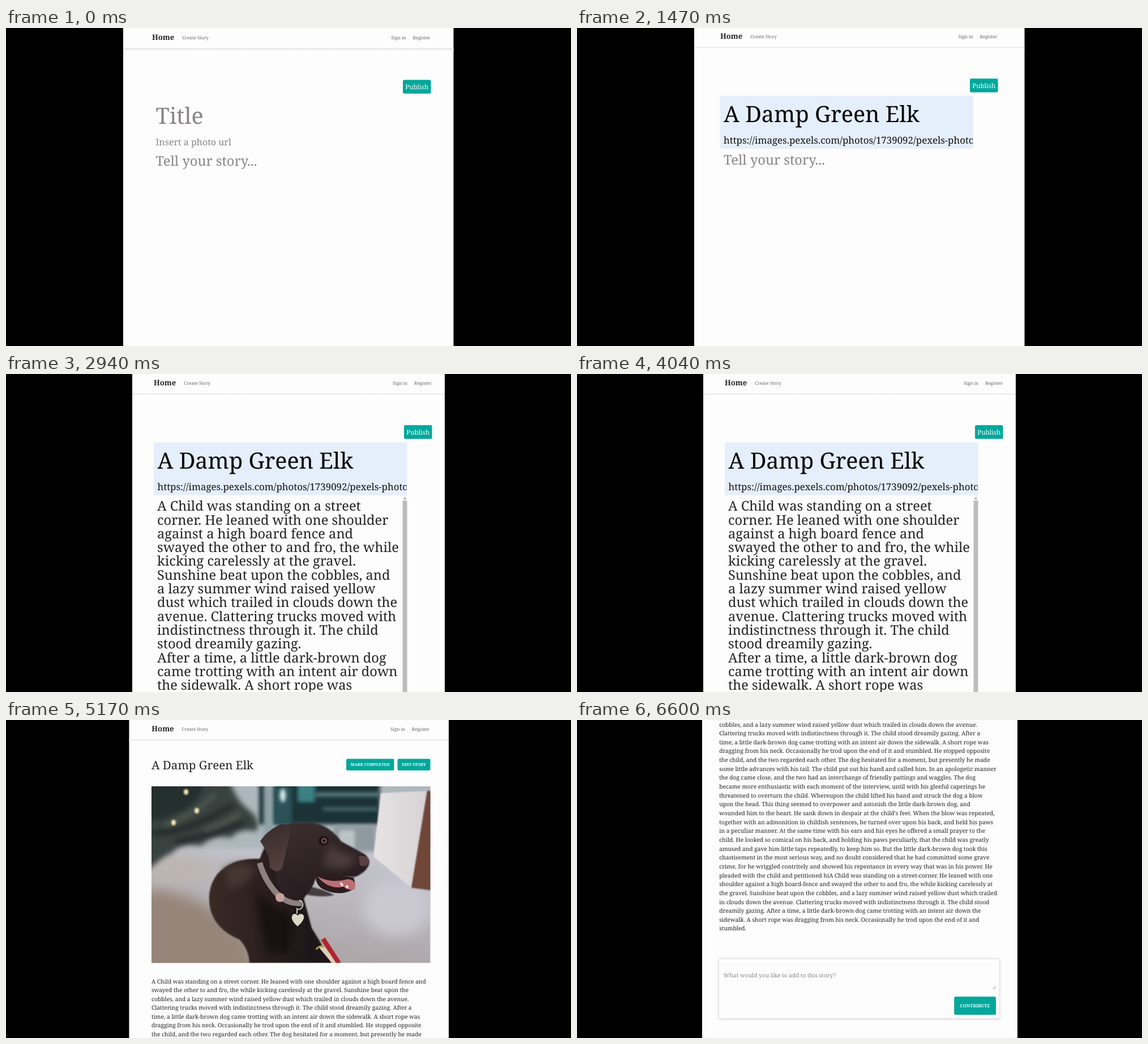
Write an HTML page with a canvas that moves like this. It is 998 by 561 pixels and loops after 6.63 s.

```html
<!DOCTYPE html>
<html lang="en">
<head>
<meta charset="utf-8">
<title>Story editor</title>
<style>
html, body { margin: 0; width: 100%; height: 100%; overflow: hidden; background: #000; }
canvas { display: block; width: 998px; height: 561px; }
</style>
</head>
<body>
<canvas id="stage" width="998" height="561"></canvas>
<script>
const LOOP = 6630;
const TEAL = '#03a79b', PAPER = '#fdfdfd', INK = '#222', HINT = '#888584';
const FAMILY = '"Noto Serif", serif';
const HEADING = 'A Damp Green Elk';
const ctx = document.getElementById('stage').getContext('2d');
ctx.textRendering = 'geometricPrecision';

const story = [
  'A Child was standing on a street corner. He leaned with one shoulder against a high board fence and',
  'swayed the other to and fro, the while kicking carelessly at the gravel. Sunshine beat upon the',
  'cobbles, and a lazy summer wind raised yellow dust which trailed in clouds down the avenue.',
  'Clattering trucks moved with indistinctness through it. The child stood dreamily gazing. After a',
  'time, a little dark-brown dog came trotting with an intent air down the sidewalk. A short rope was',
  'dragging from his neck. Occasionally he trod upon the end of it and stumbled. He stopped opposite',
  'the child, and the two regarded each other. The dog hesitated for a moment, but presently he made',
  'some little advances with his tail. The child put out his hand and called him. In an apologetic manner',
  'the dog came close, and the two had an interchange of friendly pattings and waggles. The dog',
  'became more enthusiastic with each moment of the interview, until with his gleeful caperings he',
  'threatened to overturn the child. Whereupon the child lifted his hand and struck the dog a blow',
  'upon the head. This thing seemed to overpower and astonish the little dark-brown dog, and',
  "wounded him to the heart. He sank down in despair at the child's feet. When the blow was repeated,",
  'together with an admonition in childish sentences, he turned over upon his back, and held his paws',
  'in a peculiar manner. At the same time with his ears and his eyes he offered a small prayer to the',
  'child. He looked so comical on his back, and holding his paws peculiarly, that the child was greatly',
  'amused and gave him little taps repeatedly, to keep him so. But the little dark-brown dog took this',
  'chastisement in the most serious way, and no doubt considered that he had committed some grave',
  'crime, for he wriggled contritely and showed his repentance in every way that was in his power. He',
  'pleaded with the child and petitioned hiA Child was standing on a street-corner. He leaned with one',
  'shoulder against a high board-fence and swayed the other to and fro, the while kicking carelessly at',
  'the gravel. Sunshine beat upon the cobbles, and a lazy summer wind raised yellow dust which trailed',
  'in clouds down the avenue. Clattering trucks moved with indistinctness through it. The child stood',
  'dreamily gazing. After a time, a little dark-brown dog came trotting with an intent air down the',
  'sidewalk. A short rope was dragging from his neck. Occasionally he trod upon the end of it and',
  'stumbled.'
];

const draft = [
  'A Child was standing on a street', 'corner. He leaned with one shoulder',
  'against a high board fence and', 'swayed the other to and fro, the while',
  'kicking carelessly at the gravel.', 'Sunshine beat upon the cobbles, and',
  'a lazy summer wind raised yellow', 'dust which trailed in clouds down the',
  'avenue. Clattering trucks moved with', 'indistinctness through it. The child',
  'stood dreamily gazing.', 'After a time, a little dark-brown dog',
  'came trotting with an intent air down', 'the sidewalk. A short rope was'
];

// One size factor for the whole face: the page design averages 43.67em on this line.
ctx.font = `100px ${FAMILY}`;
const sizeAdjust = 4367 / ctx.measureText(story[2]).width;

function text(str, x, y, size, color = INK, weight = 400, align = 'left') {
  ctx.font = `${weight} ${size * sizeAdjust}px ${FAMILY}`;
  ctx.textAlign = align;
  ctx.fillStyle = color;
  ctx.fillText(str, x, y);
}

function rect(x1, y1, x2, y2, color) {
  ctx.fillStyle = color;
  ctx.fillRect(x1, y1, x2 - x1, y2 - y1);
}

function shape(d, color) {
  ctx.fillStyle = color;
  ctx.fill(new Path2D(d));
}

function line(d, color, width) {
  ctx.strokeStyle = color;
  ctx.lineWidth = width;
  ctx.stroke(new Path2D(d));
}

function oval(x, y, rx, ry, color) {
  ctx.fillStyle = color;
  ctx.beginPath();
  ctx.ellipse(x, y, rx, ry, 0, 0, 7);
  ctx.fill();
}

function shade(x1, y1, x2, y2, from, to) {
  const g = ctx.createLinearGradient(x1, y1, x2, y2);
  g.addColorStop(0, from);
  g.addColorStop(1, to);
  return g;
}

function blur(radius) {
  ctx.filter = radius ? `blur(${radius}px)` : 'none';
}

function button(label, x1, y1, x2, y2, size, weight) {
  ctx.fillStyle = TEAL;
  ctx.beginPath();
  ctx.roundRect(x1, y1, x2 - x1, y2 - y1, 2.5);
  ctx.fill();
  text(label, (x1 + x2) / 2, (y1 + y2) / 2 + size * 0.35, size, '#f4fffd', weight, 'center');
}

function page(left, right) {
  rect(0, 0, 998, 561, '#000');
  rect(left, 0, right, 561, PAPER);
}

function header(left, right, homeX, signX, y, soft) {
  const edge = y + 14.5, depth = soft ? 5 : 3;
  ctx.fillStyle = shade(0, edge, 0, edge + depth, '#e2e2e2', PAPER);
  ctx.fillRect(left, edge, right - left, depth);
  text('Home', homeX, y + 0.3, 13.5, INK, 700);
  text('Create Story', homeX + 53.3, y - 1, 8.2, '#666');
  text('Sign in', signX, y - 1, 8.2, '#666');
  text('Register', signX + 38, y - 1, 8.2, '#666');
}

function editor(dx, dy, dRight, filled) {
  const x = 264.5 + dx;
  button('Publish', 701 + dRight, 91.5 + dy, 750.5 + dRight, 115.7 + dy, 11.8);
  if (!filled) {
    text('Title', x, 169, 40.5, HINT);
    text('Insert a photo url', x, 206.5, 16.4, HINT);
    return;
  }
  const left = 258 + dx, right = left + 447.5;
  rect(left, 122 + dy, right, 215 + dy, '#e5eefb');
  text(HEADING, x, 168.5 + dy, 40.5, '#000');
  ctx.save();
  ctx.beginPath();
  ctx.rect(left, 180, right - left - 1, 40);
  ctx.clip();
  text('https://images.pexels.com/photos/1739092/pexels-photo-1739092.jpeg', x, 206 + dy, 17.3, '#111');
  ctx.restore();
}

function blankDraft(t) {
  page(207, 790.5);
  header(207, 790.5, 258, 680.5, 21, t < 40);
  editor(0, 0, 0, false);
  text('Tell your story...', 264.5, 243, 24.3, HINT);
}

function titledDraft(t) {
  const [left, right] = t < 1500 ? [207, 790.5] : [222, 776];
  page(left, right);
  header(left, right, 253, 673.5, 19);
  editor(-5.5, -2.2, -7, true);
  text('Tell your story...', 259, 240.5, 24.3, HINT);
}

function fullDraft() {
  page(223, 775);
  header(223, 775, 261, 683, 20);
  editor(3, -1.2, 2, true);
  draft.forEach((row, i) => text(row, 267, 241.2 + i * 24.3, 24.2));
  rect(700.5, 214, 708.5, 561, '#f1f1f1');
  rect(700.5, 223.5, 708.5, 561, '#bdbdbd');
  shape('M702.5 220.5h4l-2-2.5z', '#777');
}

function room() {
  rect(257, 117, 750, 429, shade(500, 230, 470, 429, '#c3c3cc', '#aaa1a2'));
  blur(12);
  shape('M230 300Q330 290 420 380L450 450H230Z', '#968579');
  oval(310, 265, 60, 20, '#bdb4ae');
  oval(690, 330, 60, 50, '#cac9d2');
  blur(3);
  rect(250, 110, 760, 226, '#adb7bc');
  rect(447, 110, 660, 184, '#1b3236');
  rect(455, 110, 474, 230, '#8fa3a7');
  rect(474, 117, 505, 184, '#2b5257');
  rect(515, 110, 546, 145, '#3b8182');
  rect(546, 128, 660, 135, '#5c7f83');
  rect(560, 154, 656, 160, '#4a6a70');
  rect(580, 186, 652, 232, '#8e9a9f');
  rect(588, 194, 616, 228, '#bcc3c6');
  oval(489, 133, 5, 12, '#e4f8f9');
}

function tree() {
  blur(5);
  shape('M245 105H395Q404 139 428 158Q452 176 442 196Q410 190 398 208Q365 200 345 222Q310 214 294 234Q274 242 245 270Z', '#38423f');
  shape('M245 105H350Q345 150 300 165Q270 180 245 175Z', '#252f2d');
  line('M257 200Q320 200 400 150M300 215Q360 205 420 180', '#1f2826', 8);
  line('M280 185Q330 170 370 130M350 195Q390 180 415 165', '#59655c', 5);
  blur(1.5);
  for (const [x, y] of [[318, 127], [337, 160], [296, 181]]) oval(x, y, 4, 5, '#fbe7b4');
}

function dog() {
  blur(1);
  const coat = shade(360, 330, 540, 330, '#3b2a26', '#1d1618');
  shape('M533 293Q560 298 580 309Q556 314 530 308Z', '#443c3e');
  shape('M448 245Q400 242 373 272Q352 300 362 338Q373 371 412 387Q429 404 430 429H576Q554 389 540 367Q533 340 526 315L543 289Q535 205 510 182Q468 190 448 245Z', coat);
  shape('M472 250Q457 192 507 182Q536 178 557 185Q579 195 592 214L634 237Q645 247 640 258Q633 271 616 277L550 275L541 293Q520 325 501 319Q478 303 472 250Z', shade(490, 190, 530, 310, '#3a2d2e', '#271d20'));
  blur(7);
  shape('M385 262Q420 245 440 262Q430 290 395 300Z', '#463733');
  shape('M440 300Q465 330 505 345L500 410H460Z', '#17110f');
  shape('M570 222L622 245L600 262L560 258Z', '#4b3c3d');
  blur(0.7);
  shape('M548 271Q585 273 614 278Q620 295 611 300Q588 312 559 298Q545 290 548 271Z', '#2b1c20');
  shape('M550 276Q575 289 603 281Q620 281 616 299Q604 302 596 294Q570 300 550 276Z', '#bd6f74');
  line('M591 287l4 6M601 292l3 4', '#eee3db', 4);
  shape('M623 240Q641 238 642 251Q635 262 625 256Z', '#5c4041');
  shape('M449 214Q461 195 485 184Q504 180 501 204Q494 234 488 261Q479 273 466 260Q466 237 449 214Z', shade(460, 200, 490, 265, '#3d2f30', '#57423f'));
  oval(561, 213, 9, 8, '#1b1417');
  oval(562, 213, 5, 5, '#765549');
  oval(562, 213, 2.5, 2.5, '#15100f');

  // collar and tag
  line('M448 252Q458 286 482 310Q501 326 522 323', '#8c8081', 10);
  oval(484, 313, 8, 8, '#c7a09b');
  line('M518 318a7 8 0 1 1-4 15v9', '#c8c5c3', 2);
  shape('M515 364Q500 351 507 343Q512 340 515 345Q521 339 526 345Q528 353 515 364Z', '#ddd8c3');
}

function photo() {
  ctx.save();
  ctx.beginPath();
  ctx.rect(257, 117, 492.5, 311.5);
  ctx.clip();
  room();
  tree();
  blur(1);
  shape('M649 241L662 129L744 125L717 297Z', shade(655, 0, 740, 0, '#e6e2e3', '#d8d4d6'));
  shape('M744 125L755 125V301L716 296Z', '#6f4638');
  dog();

  // toy
  line('M556 399L582 430', '#ddcfb6', 8);
  line('M560 386L588 429', '#b3242e', 8);
  line('M548 405Q552 397 562 400', '#a79c3f', 3);
  ctx.restore();
}

function published() {
  page(217.4, 782);
  header(217.4, 782, 257.3, 679, 20);
  text(HEADING, 257, 86.5, 21.1);
  button('MARK COMPLETED', 601, 68.5, 685.5, 89, 7.2, 700);
  button('EDIT STORY', 691.5, 68.5, 749.5, 89, 7.2, 700);
  photo();
  story.slice(0, 7).forEach((row, i) => text(row, 257, 464.5 + i * 15.55, 10.42));
}

function scrolledEnd(t) {
  if (t < 5540) page(217.4, 782);
  else page(221, 778);
  story.slice(2).forEach((row, i) => text(row, 251.2, 11.5 + i * 15.65, 10.44));

  ctx.save();
  ctx.shadowColor = '#b9b9c8';
  ctx.shadowBlur = 4;
  rect(251, 422, 746, 526.5, PAPER);
  ctx.restore();
  text('What would you like to add to this story?', 259, 454, 10.42, HINT);
  line('M734.5 474.5L739.5 469.5M737.5 474.5L739.5 472.5', '#888', 1);
  button('CONTRIBUTE', 666.2, 488, 740, 520, 8.1, 700);
}

// Each scene runs until its end time.
const scenes = [
  [1300, blankDraft],
  [2740, titledDraft],
  [4070, fullDraft],
  [5300, published],
  [LOOP, scrolledEnd]
];

const start = performance.now();

function frame() {
  const t = (performance.now() - start) % LOOP;
  scenes.find(([end]) => t < end)[1](t);
  requestAnimationFrame(frame);
}
frame();
</script>
</body>
</html>
```
